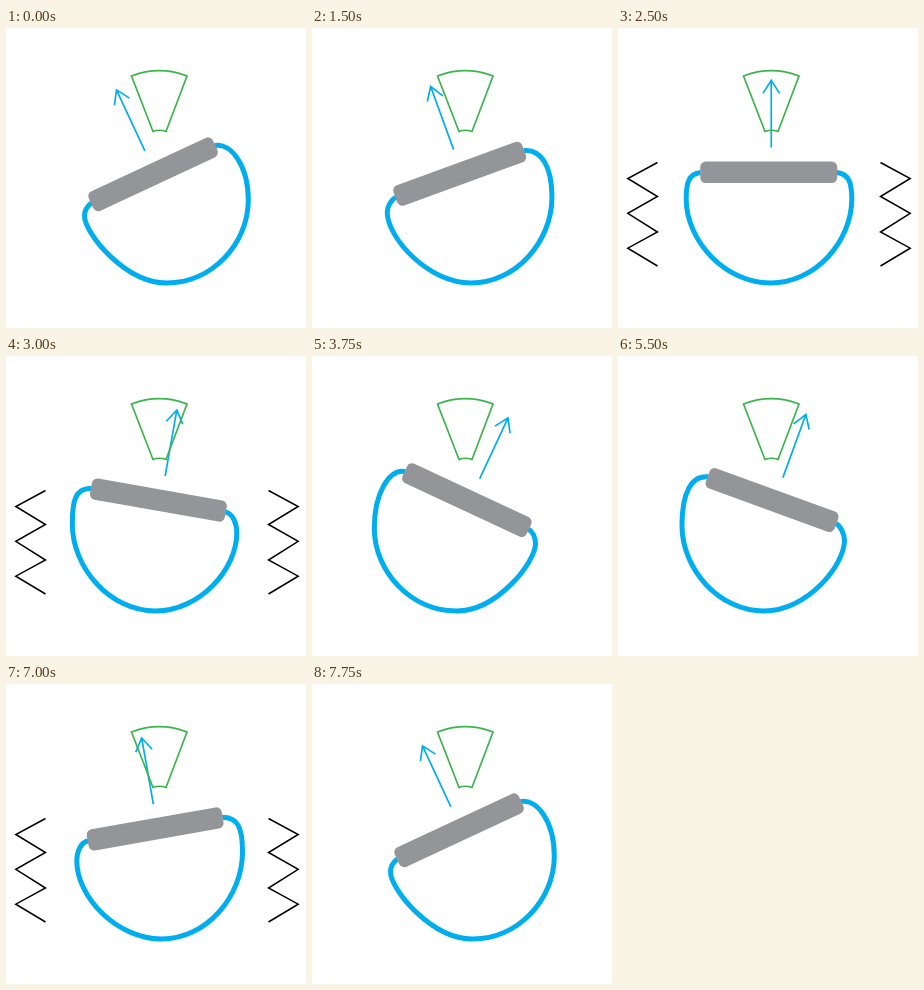
Write an HTML page that moves like this. It is 300 by 300 pixels and loops after 8 s.

```html
<!DOCTYPE html>
<html lang="en">
<head>
<meta charset="utf-8">
<title>Rocking bar</title>
<style>
  html, body { margin: 0; width: 100%; height: 100%; overflow: hidden; background: #fff; }
  svg { display: block; width: 100vw; height: 100vh; fill: none; }
</style>
</head>
<body>
<svg viewBox="0 0 300 300">
  <path id="bag" stroke="#00aeef" stroke-width="5"/>
  <g id="rocker">
    <rect x="-71" y="-20" width="137" height="21.5" rx="5.5" fill="#939598"/>
    <path d="M0-34V-101M-8.3-88.2L0-101.2L8.3-88.2" stroke="#00aeef" stroke-width="1.7"/>
  </g>
  <path d="M125.5 48A77.4 77.4 0 0 1 181 48L160 103.5A18 18 0 0 0 147 103.5Z" stroke="#39b54a" stroke-width="1.7"/>
  <g id="springs" stroke="#000" stroke-width="1.5">
    <path id="spring" d="M39.5 134.5L9.8 150.5L39.5 168.5L9.8 185.3L39.5 204L9.8 220.2L39.5 238"/>
    <use href="#spring" transform="matrix(-1 0 0 1 302 0)"/>
  </g>
</svg>
<script>
const LOOP = 8000, STEP = 250, STEPS = 10;
const PIVOT = { x: 153.25, y: 153.6 };
const KEY_ANGLES = [-25, -10, 10, 25];
const [bag, rocker, springs] = ['bag', 'rocker', 'springs'].map(id => document.getElementById(id));

// Smooth cubic through one value per key angle.
const blend = (angle, values) => values.reduce((sum, value, i) =>
  sum + KEY_ANGLES.reduce((w, key, j) =>
    j === i ? w : w * (angle - key) / (KEY_ANGLES[i] - key), value), 0);

function poseAt(time) {
  const t = time % LOOP;
  const rise = Math.floor((t - 1250) / STEP);
  const fall = STEPS - Math.floor((t - 5250) / STEP);
  return t < 5500 ? Math.max(0, Math.min(STEPS, rise)) : fall;
}

// Bezier points from the bar end to the bottom; side is 1 (right) or -1 (left).
function sidePoints(angle, side) {
  const rad = angle * Math.PI / 180, cos = Math.cos(rad), sin = Math.sin(rad);
  const lift = -side * angle;
  const along = side * 68 - 2.5, across = -9.2;
  const startX = PIVOT.x + along * cos - across * sin;
  const startY = PIVOT.y + along * sin + across * cos;
  const edgeX = blend(angle, side > 0 ? [242.3, 236.5, 230.8, 223.5] : [78.5, 70.8, 66.3, 62.3]);
  const edgeY = blend(lift, [188, 177, 168, 172]);
  const bottomX = 152.5 - 0.33 * angle, bottomY = 255;
  return [
    [startX, startY],
    [startX + side * blend(lift, [4, 8, 16, 16]), startY + blend(lift, [3, 2, 0, -3])],
    [edgeX, edgeY - blend(lift, [6, 9, 24, 35])],
    [edgeX, edgeY],
    [edgeX, edgeY + blend(lift, [17, 36, 44, 44])],
    [bottomX + side * blend(lift, [42, 45, 45, 45]), bottomY],
    [bottomX, bottomY]
  ];
}

function draw(time) {
  const pose = poseAt(time), angle = pose * 5 - 25;
  const right = sidePoints(angle, 1), left = sidePoints(angle, -1).reverse();
  const [start, ...curve] = [...right, ...left.slice(1)];
  bag.setAttribute('d', `M${start}C${curve.join(' ')}`);
  rocker.setAttribute('transform', `translate(${PIVOT.x} ${PIVOT.y}) rotate(${angle})`);
  springs.style.display = Math.abs(angle) <= 10 ? '' : 'none';
}

function tick() {
  draw(performance.now());
  requestAnimationFrame(tick);
}
tick();
</script>
</body>
</html>
```
